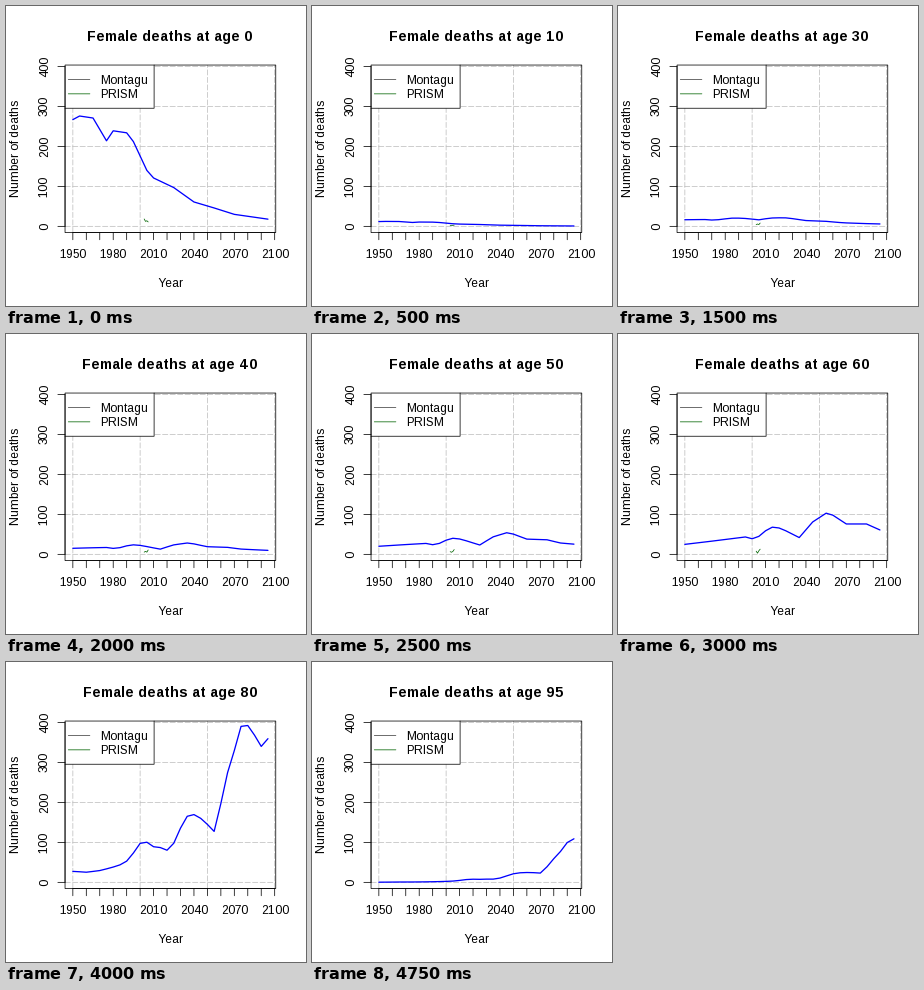
Recreate the animation shown at these times as a matplotlib script. Size 300 px wide and 300 px high, loop 5 s.

```python
import numpy as np
import matplotlib.pyplot as plt
from matplotlib.animation import FuncAnimation
from matplotlib.patches import Rectangle

SIZE, DPI = 300, 100
PT = 72 / DPI          # points per pixel
LINE = 14.4            # height of one margin line
LEFT, RIGHT, TOP, BOTTOM = 59.04, 269.76, 59.04, 226.56
LEGEND_RIGHT, LEGEND_BOTTOM = 148.1, TOP + 3 * LINE
THIN, THICK = 0.75, 1.3
YEARS = np.arange(1950, 2100, 5)
SURVEY_YEARS = np.arange(2003, 2007)
PEAK = 388

plt.rcParams.update({
    "font.family": "Liberation Sans",
    "text.hinting": "force_autohint",
    "text.hinting_factor": 1,
    "text.kerning_factor": 6,
    "lines.solid_capstyle": "round",
    "lines.dash_capstyle": "round",
    "path.snap": False,
})

# Turning points: (year, deaths) at ages 0 and 20, (birth year, deaths) at age 60
INFANT = [(1950, 267), (1955, 276), (1965, 271), (1975, 214), (1980, 239),
          (1990, 234), (1995, 212), (2005, 140), (2010, 121), (2025, 97),
          (2040, 61), (2055, 46), (2070, 30), (2095, 18)]
YOUTH = [(1950, 17), (1970, 16.5), (1985, 20), (1995, 20.5), (2010, 17.5),
         (2030, 11), (2045, 9), (2060, 6), (2095, 3)]
COHORT = [(1850, 20), (1870, 29), (1880, 24), (1890, 25), (1910, 33),
          (1935, 43.5), (1940, 39), (1945, 45), (1950, 59), (1955, 68),
          (1960, 66), (1965, 59), (1975, 42), (1985, 81), (1995, 103),
          (2000, 98), (2010, 76), (2025, 76), (2035, 61), (2055, 52)]

# Adult deaths relative to age 60: (age, ratio, yearly growth of the ratio)
RISK = [(40, 0.32, -0.006), (60, 1, 0), (70, 2.07, 0.0038),
        (80, 2.87, 0.0111), (85, 2.1, 0.0167), (95, 0.48, 0.028)]

# Survey values by age
SURVEY = [(0, 18.5, 12.5, 14, 11), (10, 2.5, 2.5, 2.5, 3),
          (40, 5.5, 7.5, 5.5, 11), (60, 8, 3, 9, 13)]


def along(points, x):
    return np.interp(x, *zip(*points))


def child(age):
    scale = np.interp(age, [0, 5, 10], [0, -3.19, -2.77])
    power = np.interp(age, [0, 5, 10], [1, 1.147, 0.94])
    return np.exp(scale) * along(INFANT, YEARS) ** power


def adult(age):
    ages, ratios, growths = zip(*RISK)
    born = YEARS - age
    level = np.interp(age, ages, np.log(ratios))
    growth = np.interp(age, ages, growths)
    bump = 0.6 * np.clip((age - 60) / 20, 0, 1) ** 2
    surge = 1 + bump * np.exp(-((born - 1921) / 8) ** 2)
    return along(COHORT, born) * np.exp(level + growth * (born - 1970)) * surge


def blend(a, b, mix):
    return a ** (1 - mix) * b ** mix


def model(age):
    if age <= 10:
        return child(age)
    if age <= 20:
        return blend(child(10), along(YOUTH, YEARS), (age - 10) / 10)
    if age < 40:
        return blend(along(YOUTH, YEARS - age + 20), adult(age), (age - 20) / 20)
    return adult(age)


def survey(age):
    ages, *columns = zip(*SURVEY)
    return np.array([np.interp(age, ages, c, right=np.nan) for c in columns])


def px(year):
    return LEFT + (RIGHT - LEFT) * ((np.asarray(year) - 1950) / 145 + 0.04) / 1.08


def py(value):
    return BOTTOM - (BOTTOM - TOP) * (np.asarray(value) / PEAK + 0.04) / 1.08


fig = plt.figure(figsize=(SIZE / DPI, SIZE / DPI), dpi=DPI, facecolor="white")
ax = fig.add_axes([0, 0, 1, 1])
ax.set_xlim(0, SIZE)
ax.set_ylim(SIZE, 0)
ax.axis("off")


def stroke(xs, ys, color="black", z=4, width=THIN, **kw):
    return ax.plot(xs, ys, color=color, lw=width * PT, zorder=z, **kw)[0]


def label(x, y, text, size=12, ha="center", **kw):
    return ax.text(x, y, text, fontsize=size * PT, ha=ha, va="baseline",
                   zorder=6, **kw)


def side_label(x, y, text):
    label(x, y, text, rotation=90, rotation_mode="anchor")


def rect(x0, y0, x1, y1, z, fill="none", edge="none"):
    return ax.add_patch(Rectangle((x0, y0), x1 - x0, y1 - y0, facecolor=fill,
                                  edgecolor=edge, lw=THIN * PT, zorder=z))


# Plot box and grid
box = rect(LEFT, TOP, RIGHT, BOTTOM, 4, edge="black")
grid = dict(color="#bebebe", z=1, dashes=(7, 3))
rules = [stroke([px(year)] * 2, [BOTTOM, TOP], **grid)
         for year in range(1950, 2101, 50)]
rules += [stroke([LEFT, RIGHT], [py(value)] * 2, **grid)
          for value in range(0, 401, 100)]
for rule in rules:
    rule.set_clip_path(box)

# Axes
stroke(px([1950, 2100]), [BOTTOM] * 2)
stroke([LEFT] * 2, py([0, 400]))
for year in range(1950, 2101, 10):
    stroke([px(year)] * 2, [BOTTOM, BOTTOM + LINE / 2])
for year in range(1950, 2101, 30):
    label(px(year), BOTTOM + 1.8 * LINE, str(year))
for value in range(0, 401, 100):
    stroke([LEFT, LEFT - LINE / 2], [py(value)] * 2)
    side_label(LEFT - 1.2 * LINE, py(value), str(value))
label((LEFT + RIGHT) / 2, BOTTOM + 3.8 * LINE, "Year")
side_label(LEFT - 3.2 * LINE, (TOP + BOTTOM) / 2, "Number of deaths")

# Legend
rect(LEFT, TOP, LEGEND_RIGHT, LEGEND_BOTTOM, 3, fill="white")
stroke([LEFT, LEGEND_RIGHT, LEGEND_RIGHT],
       [LEGEND_BOTTOM, LEGEND_BOTTOM, TOP])
for row, (name, color) in enumerate([("Montagu", "#404040"), ("PRISM", "darkgreen")], 1):
    y = TOP + row * LINE
    stroke([62.28, 83.88], [y, y], color, z=5)
    label(93.9, y + 4.4, name, ha="left")

title = label((LEFT + RIGHT) / 2, 35, "", size=14.4, weight="bold")
model_line = stroke(px(YEARS), py(YEARS * 0), "blue", z=2, width=THICK)
survey_line = stroke(px(SURVEY_YEARS), py(SURVEY_YEARS * 0), "darkgreen", z=2)


def draw(i):
    age = 5 * i
    title.set_text(f"Female deaths at age {age}")
    model_line.set_ydata(py(model(age)))
    survey_line.set_ydata(py(survey(age)))
    return title, model_line, survey_line


anim = FuncAnimation(fig, draw, frames=20, interval=250, repeat=True,
                     repeat_delay=0, blit=False)
plt.show()
```
